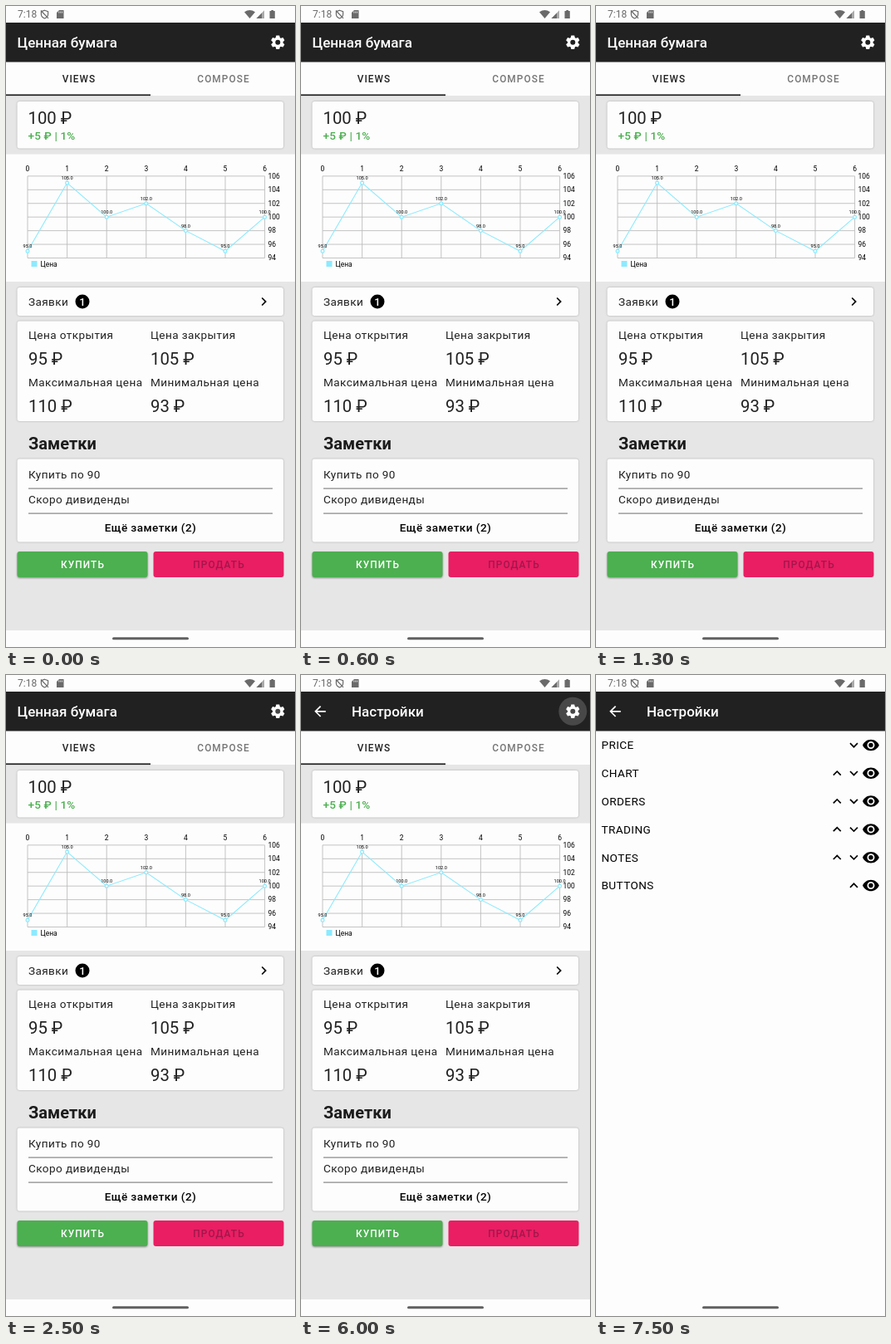
An HTML page that plays this animation: 348x772 px, repeating every 8000 ms.

```html
<!DOCTYPE html>
<html lang="ru">
<head>
<meta charset="utf-8">
<style>
html, body { margin: 0; width: 100%; height: 100%; overflow: hidden; background: #fdfdfd; }
svg { display: block; width: 348px; height: 772px; font-family: Roboto, sans-serif; }
text { white-space: pre; }
.title { font-size: 17px; font-weight: 500; fill: #fff; }
.big { font-size: 20.3px; fill: #212121; }
.head { font-size: 20px; font-weight: 700; fill: #1c1c1c; }
.body { font-size: 13.55px; letter-spacing: .42px; fill: #212121; }
.more { font-size: 13.55px; font-weight: 500; letter-spacing: .42px; fill: #000; }
.gain { font-size: 13.55px; font-weight: 500; letter-spacing: .13px; fill: #4caf50; }
.caps { font-size: 11.85px; font-weight: 500; letter-spacing: 1.06px; }
.axis { font-size: 8.46px; fill: #000; }
.val { font-size: 5.6px; fill: #000; }
.mid { text-anchor: middle; }
.card { fill: #fdfdfd; filter: drop-shadow(0 .8px .8px #0004); }
.btn { filter: drop-shadow(0 1.2px 1.2px #0006); }
</style>
</head>
<body>
<svg id="stage" viewBox="0 0 348 772"></svg>
<script>
const text = (x, y, cls, s, fill) =>
  `<text x="${x}" y="${y}" class="${cls}"${fill ? ` style="fill:${fill}"` : ''}>${s}</text>`;
const rect = (x, y, w, h, fill, extra = '') =>
  `<rect x="${x}" y="${y}" width="${w}" height="${h}" fill="${fill}" ${extra}/>`;
const card = (y, h) => rect(13.5, y, 320.5, h, '#fdfdfd', 'rx="3" class="card"');
const circle = (x, y, r, extra) => `<circle cx="${x}" cy="${y}" r="${r}" ${extra}/>`;
// 24-unit icon centred on x, y
const icon = (x, y, d, fill = '#000', scale = .846, turn = 0) =>
  `<path transform="translate(${x} ${y}) rotate(${turn}) scale(${scale}) translate(-12 -12)" fill="${fill}" d="${d}"/>`;

const CHEVRON = 'M16.59 8.59L12 13.17 7.41 8.59 6 10l6 6 6-6z';
const BACK = 'M20 11H7.83l5.59-5.59L12 4l-8 8 8 8 1.41-1.41L7.83 13H20z';
const EYE = 'M12 4.5C7 4.5 2.73 7.61 1 12c1.73 4.39 6 7.5 11 7.5s9.27-3.11 11-7.5c-1.73-4.39-6-7.5-11-7.5z' +
  'M12 17a5 5 0 1 1 0-10a5 5 0 1 1 0 10zM12 9a3 3 0 1 0 0 6a3 3 0 1 0 0-6z';

function statusBar() {
  const c = '#6a6a6a';
  return rect(0, 0, 348, 20, '#fdfdfd') +
    `<text x="14" y="14.3" font-size="12" fill="${c}">7:18</text>` +
    `<path d="M46.5 5.2L50.6 6.7V10Q50.6 13.4 46.5 15Q42.4 13.4 42.4 10V6.7ZM42 5.5L51 14.8" fill="none" stroke="${c}" stroke-width="1.2"/>
    <path d="M64 5H69.5V15H61V8Z" fill="${c}"/>
    <path d="M63.8 6.5V8.5M65.7 6.5V8.5M67.6 6.5V8.5" stroke="#fdfdfd" stroke-width=".8"/>
    <path d="M287 7.2Q293.5 2.6 300 7.2L293.5 15Z" fill="${c}"/>
    <path d="M301.5 15L311 5.3V15Z" fill="#aaa"/><path d="M301.5 15L308 8.4V15Z" fill="${c}"/>
    <path d="M317.5 6H319.3V5H322V6H323.8V15H317.5Z" fill="${c}"/>`;
}

function gear() {
  const teeth = [0, 60, 120, 180, 240, 300].map(a =>
    `<path transform="rotate(${a})" d="M-2.7-5L-1.9-8.3H1.9L2.7-5Z"/>`).join('');
  return `<g id="gear" transform="translate(327.3 43.8)" fill="#fff">${teeth}` +
    circle(0, 0, 4.6, 'fill="none" stroke="#fff" stroke-width="3.2"') + '</g>';
}

function chart() {
  const px = i => 26 + i * 47.6, py = v => 303.5 - (v - 94) * 8.22;
  const data = [95, 105, 100, 102, 98, 95, 100];
  let grid = '', labels = '', dots = '';
  for (let i = 0; i < 7; i++) {
    const v = 94 + 2 * i, x = px(i), y = py(data[i]);
    grid += `M${x} 204.9V303.5M26 ${py(v)}H311.6`;
    labels += text(x, 199.4, 'axis mid', i) + text(315.5, py(v) + 2.8, 'axis', v);
    dots += circle(x, y, 1.9, 'fill="#fff" stroke="#8ceaff" stroke-width="1.2"') +
      text(x, y - 4, 'val mid', data[i].toFixed(1));
  }
  return rect(0, 178.5, 348, 153.5, '#fdfdfd') +
    `<path d="${grid}" stroke="#bdbdbd" stroke-width=".9"/>` + labels +
    `<polyline points="${data.map((v, i) => px(i) + ',' + py(v))}" fill="none" stroke="#8ceaff" stroke-width="1.1"/>` +
    dots + rect(30.5, 307, 7, 7, '#8ceaff') + text(41.5, 313.6, 'axis', 'Цена');
}

function mainPage() {
  const stats = [
    [27, 401, 'Цена открытия', '95 ₽'], [174, 401, 'Цена закрытия', '105 ₽'],
    [27, 458, 'Максимальная цена', '110 ₽'], [174, 458, 'Минимальная цена', '93 ₽']
  ].map(([x, y, name, value]) => text(x, y, 'body', name) + text(x, y + 31, 'big', value)).join('');
  return rect(0, 67, 348, 685, '#e6e6e6') + rect(0, 67, 348, 41, '#fdfdfd') +
    text(88, 92.4, 'caps mid', 'VIEWS', '#212121') + text(262, 92.4, 'caps mid', 'COMPOSE', '#757575') +
    rect(0, 106.4, 174, 1.7, '#212121') +
    card(115, 56.5) + text(26.5, 142, 'big', '100 ₽') + text(26.5, 161, 'gain', '+5 ₽ | 1%') +
    chart() +
    card(339, 34) + text(27, 361, 'body', 'Заявки') + circle(92, 356, 8.5, 'fill="#000"') +
    '<text x="92" y="360.6" class="mid" font-size="13" font-weight="500" fill="#fff">1</text>' +
    icon(310.5, 356, CHEVRON, '#000', .846, -90) +
    card(379.5, 120.5) + stats +
    text(27, 534, 'head', 'Заметки') +
    card(545.5, 100) + text(27, 568.5, 'body', 'Купить по 90') + text(27, 598.5, 'body', 'Скоро дивиденды') +
    rect(27, 580.3, 294, 1.7, '#a8a8a8') + rect(27, 610.3, 294, 1.7, '#a8a8a8') +
    text(174, 633, 'more mid', 'Ещё заметки (2)') +
    rect(13.5, 657, 157, 31, '#4caf50', 'rx="3" class="btn"') +
    rect(177.5, 657, 157, 31, '#e91e63', 'rx="3"') +
    text(92.5, 677, 'caps mid', 'КУПИТЬ', '#fff') + text(256.5, 677, 'caps mid', 'ПРОДАТЬ', '#a3164a');
}

function settingsPage() {
  const names = ['PRICE', 'CHART', 'ORDERS', 'TRADING', 'NOTES', 'BUTTONS'];
  return rect(0, 67, 348, 685, '#fdfdfd') + names.map((name, i) => {
    const y = 84.5 + i * 33.8, last = i === names.length - 1;
    return text(6.5, y + 4.8, 'body', name, '#000') +
      (i ? icon(last ? 310.5 : 290.3, y, CHEVRON, '#000', .846, 180) : '') +
      (last ? '' : icon(310.5, y, CHEVRON)) +
      icon(331, y, EYE, '#000', .9);
  }).join('');
}

const $ = id => document.getElementById(id);
$('stage').innerHTML = rect(0, 0, 348, 772, '#fdfdfd') + statusBar() +
  `<g id="main">${mainPage()}</g><g id="settings">${settingsPage()}</g>` +
  rect(0, 20, 348, 47.5, '#212121') +
  `<g id="home">${text(13.5, 50.4, 'title', 'Ценная бумага')}</g>` +
  `<g id="sub">${icon(23, 43.8, BACK, '#fff')}${text(61, 50.4, 'title', 'Настройки')}</g>` +
  circle(327.3, 43.8, 0, 'id="ripple" fill="#484848"') + gear() +
  rect(128, 760.3, 92, 3, '#606060', 'rx="1.5"');

const PRESS = 2500, TITLE = 2600, OPEN = 7400, LOOP = 8000;
const show = (id, on) => $(id).setAttribute('display', on ? 'inline' : 'none');

function draw(t) {
  const open = t >= OPEN, sub = t >= TITLE;
  show('main', !open);
  show('settings', open);
  show('home', !sub);
  show('sub', sub);
  show('gear', !open);
  const grow = Math.min(1, (t - PRESS + 100) / 300);
  $('ripple').setAttribute('r', t < PRESS || open ? 0 : 17 * grow);
}

const start = performance.now();
function tick() {
  draw((performance.now() - start) % LOOP);
  requestAnimationFrame(tick);
}
tick();
</script>
</body>
</html>
```
